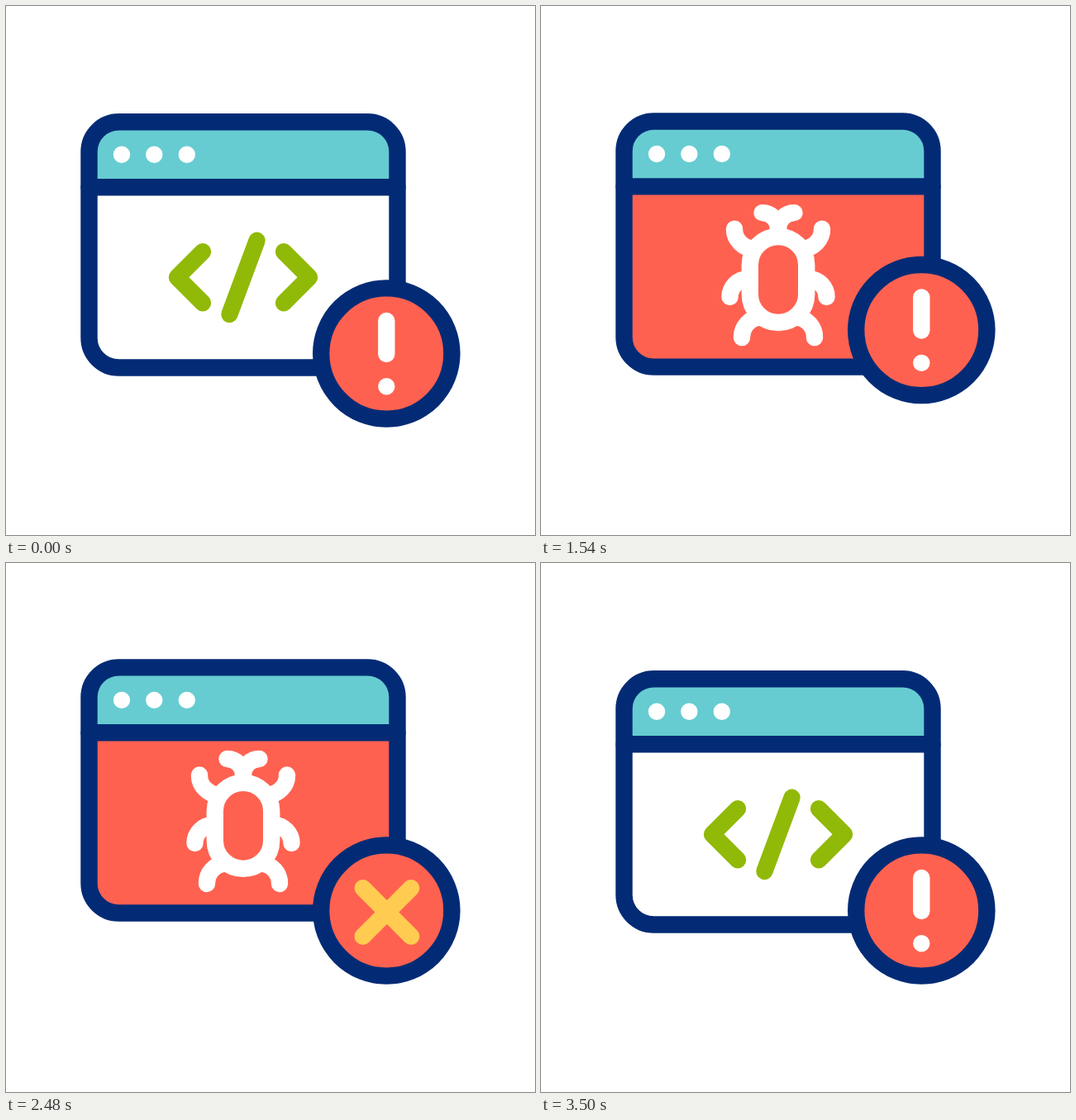
Recreate the animation shown at these times as an HTML page. Size 640 by 640 pixels, loop 3600 ms.

```html
<!DOCTYPE html>
<html lang="en">
<head>
<meta charset="utf-8">
<title>Bug alert</title>
<style>
  html, body { margin: 0; width: 100%; height: 100%; overflow: hidden; background: #fff; }
  svg { display: block; width: 100vw; height: 100vh; }
  .line { fill: none; stroke-width: 20.4; stroke-linecap: round; stroke-linejoin: round; }
  .navy { stroke: #032b75; }
  .white { stroke: #fff; }
  .green { stroke: #91b907; }
  .yellow { stroke: #ffcc51; }
</style>
</head>
<body>
<svg viewBox="0 0 640 640">
  <defs>
    <clipPath id="frame"><rect x="100.5" y="140.3" width="373" height="297.2" rx="36"/></clipPath>
    <g id="limbs" class="line white">
      <path d="M267.5 251A19.5 19.5 0 0 1 287 270.5"/>
      <path d="M234 270.5A26 24 0 0 0 258 295"/>
      <path d="M228.5 353A22 22 0 0 1 250 331"/>
      <path d="M243 402A24 24 0 0 1 265 377.5"/>
    </g>
  </defs>

  <g id="window">
    <g clip-path="url(#frame)">
      <path d="M90 130H484V219H90Z" fill="#66ccd1"/>
    </g>
    <g class="line green">
      <path id="left" d="M238 297.3L207 328.3L238 359.3"/>
      <path id="right" d="M336 297.3L367 328.3L336 359.3"/>
      <path id="slash"/>
    </g>
    <g id="bug">
      <path d="M90 219H484V448H90Z" fill="#ff6150" clip-path="url(#frame)"/>
      <rect class="line white" x="252.8" y="279.8" width="68.4" height="104" rx="34.2"/>
      <use href="#limbs"/>
      <use href="#limbs" transform="matrix(-1 0 0 1 574 0)"/>
    </g>
    <path class="line navy" d="M100.5 219.2H473.5"/>
    <rect class="line navy" x="100.5" y="140.3" width="373" height="297.2" rx="36"/>
    <path class="line white" d="M140 179.8h0M179.3 179.8h0M218.8 179.8h0"/>
    <path id="lights" class="line yellow" style="stroke-width:23" d="M140 179.8h0M179.3 179.8h0M218.8 179.8h0"/>
  </g>

  <g id="badge">
    <circle class="line navy" cx="460.3" cy="420.5" r="79.1" style="fill:#ff6150"/>
    <path id="mark" class="line white" d="M460.3 381V421M460.3 460.3h0"/>
    <path id="cross" class="line yellow" d="M431.7 393.2L490.1 451.7M490.1 393.2L431.7 451.7"/>
  </g>
</svg>
<script>
const LOOP = 3600, BEAT = 300, FADE = 40;
const $ = id => document.getElementById(id);
const clamp = (x, lo, hi) => Math.min(hi, Math.max(lo, x));

// Eases through the values, one beat apart, and holds the ends.
function ease(t, start, ...values) {
  const p = clamp((t - start) / BEAT, 0, values.length - 1);
  const i = Math.min(Math.floor(p), values.length - 2);
  const x = p - i;
  return values[i] + (values[i + 1] - values[i]) * x * x * (3 - 2 * x);
}

// Opacity of something shown from one time to another.
const shown = (t, from, to) => clamp((t - from) / FADE, 0, 1) - clamp((t - to) / FADE, 0, 1);
const move = (id, x, y) => $(id).setAttribute('transform', `translate(${x} ${y})`);

function draw(t) {
  const spread = ease(t, 0, 0, 1, 0, 1, 0);
  move('left', -20.4 * spread, 0);
  move('right', 20.4 * spread, 0);
  const size = 1 + 0.4 * spread, dx = 16.6 * size, dy = 44.6 * size;
  $('slash').setAttribute('d', `M${287 + dx} ${328.4 - dy}L${287 - dx} ${328.4 + dy}`);

  const tilt = ease(t, 0, 0, -10, 10, -10, 0);
  $('mark').setAttribute('transform', `rotate(${tilt} 460.3 420.5)`);
  move('badge', 0, ease(t, 1200, 0, -30, 0));
  move('window', 0, ease(t, 1500, 0, -17, 0, -17, 0, -17, 0));

  const cross = shown(t, 1800, 3460);
  $('bug').style.opacity = shown(t, 1200, 3460);
  $('cross').style.opacity = cross;
  $('mark').style.opacity = 1 - cross;
  $('lights').style.opacity = t < 3400 ? shown(t % 900, 300, 600) : 0;
}

function tick() {
  draw(performance.now() % LOOP);
  requestAnimationFrame(tick);
}
tick();
</script>
</body>
</html>
```
